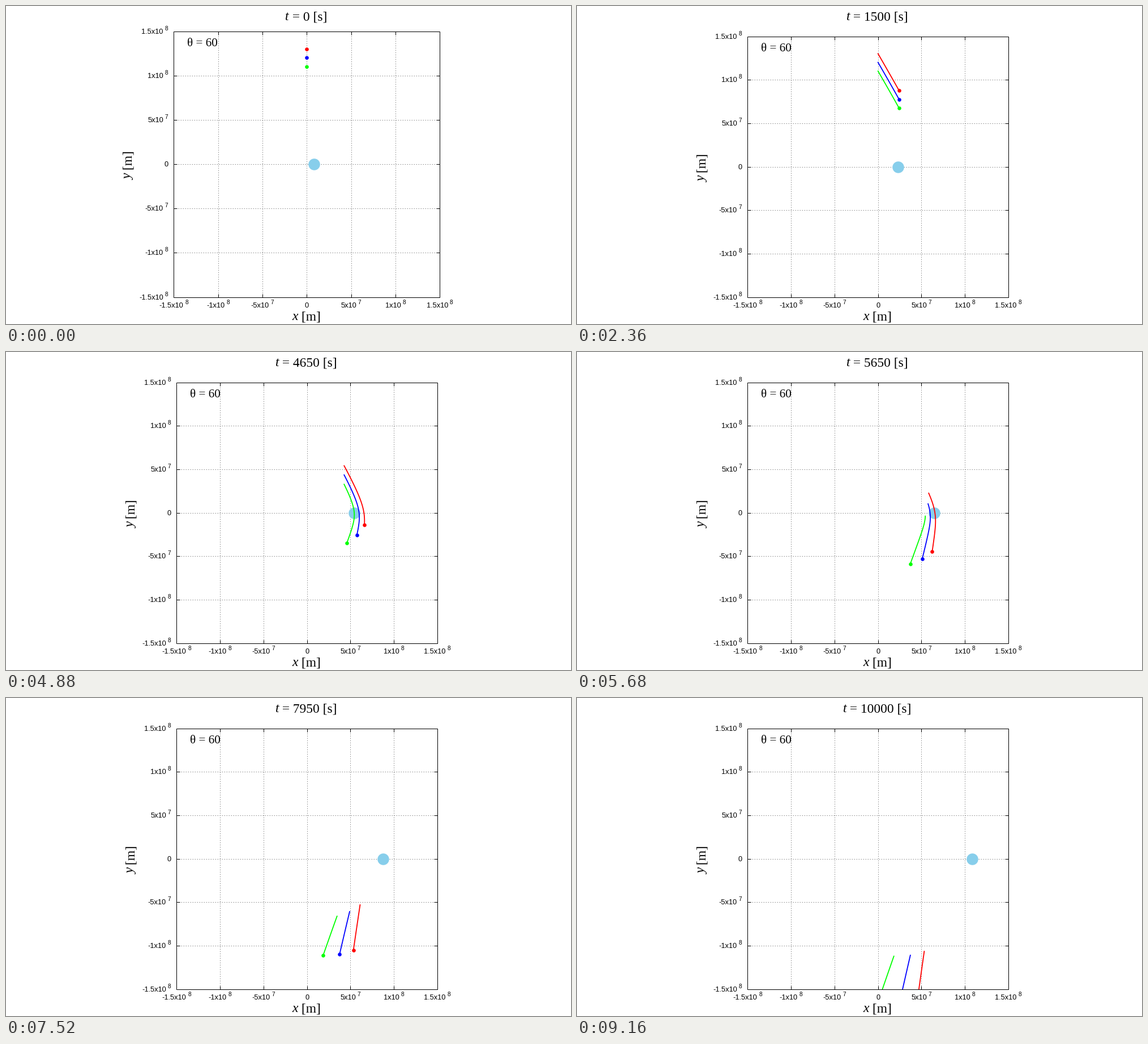
Animation of 998 by 561 pixels, one loop 9200 ms. Source, as a matplotlib script:

```python
import matplotlib.pyplot as plt
import numpy as np
from matplotlib.animation import FuncAnimation
from matplotlib.patches import Rectangle

W, H, DPI = 998, 561, 64
PX = 72 / DPI                     # points per pixel
FRAMES, INTERVAL = 230, 40
HOLD = 29                         # frames before the clock starts
STEP, SUBSTEPS, TRAIL = 50, 10, 40

GM = 5.79e15
PLANET_X, PLANET_V = 8e6, 1e4
SPEED, THETA = 3.222e4, 60
START_Y = (1.3e8, 1.2e8, 1.1e8)
COLORS = ("#ff0000", "#0000ff", "#00ff00")
LIMIT = 1.5e8

# plot boxes in pixels: left, right, top, bottom
OPENING_BOX = (296.5, 766.5, 44.5, 513.5)
MAIN_BOX = (301.5, 762.0, 53.5, 513.5)

LABEL, NOTE, TICK = 23.5, 21.3, 12.8
TICK_VALUES = ((-1.5, 8), (-1, 8), (-5, 7), (0, 0), (5, 7), (1, 8), (1.5, 8))


def simulate():
    """Positions of the three bodies at every clock step, shape (steps, 3, 2)."""
    angle = np.radians(THETA)
    pos = np.array([(0.0, y) for y in START_Y])
    vel = np.tile((SPEED * np.cos(angle), -SPEED * np.sin(angle)), (3, 1))
    dt = STEP / SUBSTEPS

    def pull(t):
        d = np.array((PLANET_X + PLANET_V * t, 0)) - pos
        return GM * d / np.linalg.norm(d, axis=1, keepdims=True) ** 3

    path = [pos.copy()]
    acc = pull(0)
    for i in range(1, (FRAMES - 1 - HOLD) * SUBSTEPS + 1):
        vel += acc * dt / 2
        pos += vel * dt
        acc = pull(i * dt)
        vel += acc * dt / 2
        if i % SUBSTEPS == 0:
            path.append(pos.copy())
    return np.array(path)


def to_px(box, x, y):
    left, right, top, bottom = box
    return (left + (x / LIMIT + 1) / 2 * (right - left),
            bottom - (y / LIMIT + 1) / 2 * (bottom - top))


def make_text(string, size, family="Liberation Serif", **style):
    return ax.text(0, 0, string, fontsize=size * PX, family=family,
                   va="baseline", ha="left", rotation_mode="anchor", **style)


def arrange(parts, x, y, align=0.5, rises=(0, 0), vertical=False):
    """Set text parts one after another along a baseline."""
    widths = [p.get_window_extent().width for p in parts]
    offset = -align * sum(widths)
    for part, width, rise in zip(parts, widths, rises):
        if vertical:
            part.set(position=(x, y - offset), rotation=90)
        else:
            part.set_position((x + offset, y - rise))
        offset += width
    return parts


def tick_label(mantissa, power, x, y, align):
    if not mantissa:
        parts = [make_text("0", TICK, "Liberation Sans")]
    else:
        parts = [make_text(f"{mantissa:g}x10", TICK, "Liberation Sans"),
                 make_text(f" {power}", TICK * 0.8, "Liberation Sans")]
    return arrange(parts, x, y, align, rises=(0, 6))


def draw_frame(box):
    """Grid, border, ticks and labels of one plot box."""
    left, right, top, bottom = box
    inner = np.arange(-2, 3) / 3 * LIMIT
    xs, ys = to_px(box, inner, inner)
    grid = dict(colors="#8c8c8c", lw=PX, linestyles=[(0, (1.6, 2.4))], zorder=1)
    line = dict(colors="black", lw=PX, zorder=2)
    artists = [
        ax.vlines(xs, top, bottom, **grid), ax.hlines(ys, left, right, **grid),
        ax.vlines(xs, top, top + 6, **line), ax.vlines(xs, bottom - 6, bottom, **line),
        ax.hlines(ys, left, left + 6, **line), ax.hlines(ys, right - 6, right, **line),
        ax.add_patch(Rectangle((left, top), right - left, bottom - top,
                               fill=False, ec="black", lw=PX, zorder=2)),
    ]
    for mantissa, power in TICK_VALUES:
        value = mantissa * 10 ** power
        x, y = to_px(box, value, value)
        artists += tick_label(mantissa, power, x, 531.5, 0.5)
        artists += tick_label(mantissa, power, left - 10, y + 4, 1)

    artists += arrange([make_text("y", LABEL, style="italic"), make_text(" [m]", LABEL)],
                       left - 74.3, (top + bottom) / 2 + 1.4, vertical=True)
    artists += arrange([make_text(f"θ = {THETA}", NOTE)],
                       left + 0.05 * (right - left), top + 26.5, 0)
    return artists


fig = plt.figure(figsize=(W / DPI, H / DPI), dpi=DPI, facecolor="white")
ax = fig.add_axes([0, 0, 1, 1])
ax.set(xlim=(0, W), ylim=(H, 0))
ax.axis("off")

opening = draw_frame(OPENING_BOX)
main = draw_frame(MAIN_BOX)
arrange([make_text("x", LABEL, style="italic"), make_text(" [m]", LABEL)], 530.3, 554)
title = [make_text("t", LABEL, style="italic"), make_text("", LABEL)]

planet, = ax.plot([], [], "o", ms=20.5 * PX, mew=0, color="skyblue", zorder=3)
trails = [ax.plot([], [], color=c, lw=1.8 * PX, zorder=4)[0] for c in COLORS]
heads = [ax.plot([], [], "o", ms=6.6 * PX, mew=0, color=c, zorder=5)[0] for c in COLORS]

clip = Rectangle((301, 44), 462, 470, transform=ax.transData)
for artist in (planet, *trails, *heads):
    artist.set_clip_path(clip)

path = simulate()


def update(frame):
    step = max(0, frame - HOLD)
    t = step * STEP
    box = MAIN_BOX if frame else OPENING_BOX
    for artist in opening:
        artist.set_visible(frame == 0)
    for artist in main:
        artist.set_visible(frame > 0)

    title[1].set_text(f" = {t} [s]")
    arrange(title, 530.3, 25.2)

    x, y = to_px(box, PLANET_X + PLANET_V * t, 0)
    planet.set_data([x], [y])
    recent = path[max(0, step - TRAIL):step + 1]
    for i, (trail, head) in enumerate(zip(trails, heads)):
        xs, ys = to_px(box, recent[:, i, 0], recent[:, i, 1])
        trail.set_data(xs, ys)
        head.set_data(xs[-1:], ys[-1:])
    return [planet, *trails, *heads, *title]


anim = FuncAnimation(fig, update, frames=FRAMES, interval=INTERVAL,
                     repeat=True, repeat_delay=0, blit=False)
plt.show()
```
